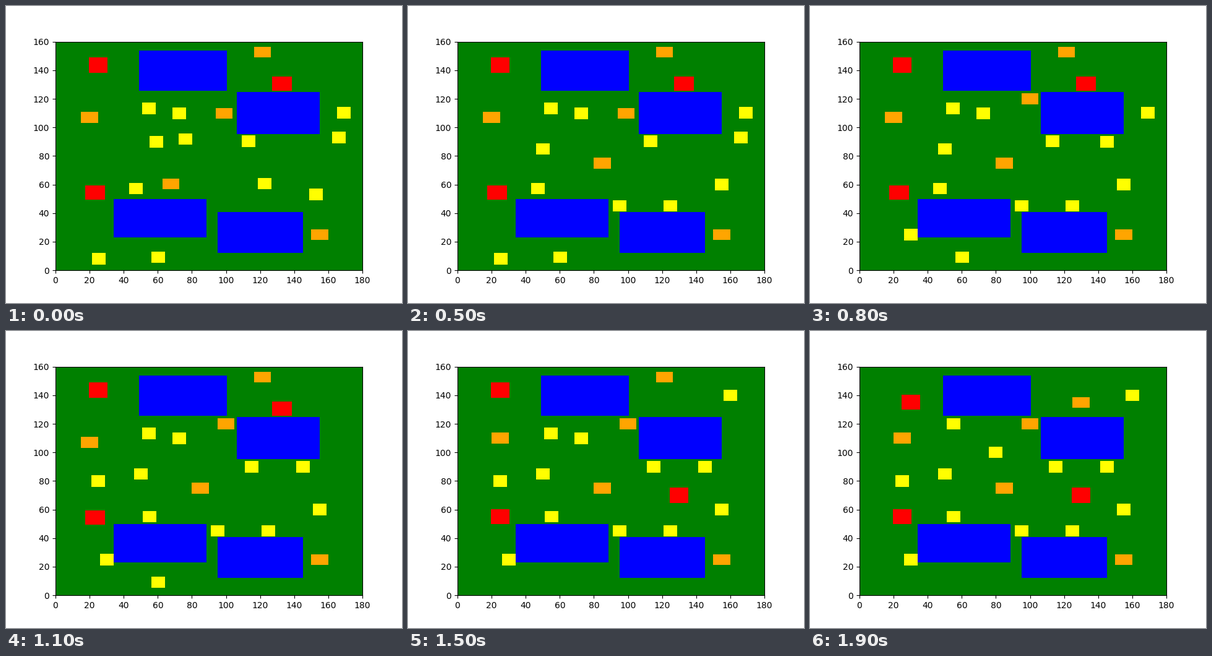
Recreate the animation shown at these times as a matplotlib script. Size 640 px wide and 480 px high, loop 2 s.

```python
import matplotlib.pyplot as plt
from matplotlib.animation import FuncAnimation
from matplotlib.patches import Rectangle

STEPS = 20
STEP_MS = 100

# kind: colour, width, height
KINDS = {
    "small": ("yellow", 8, 8),
    "medium": ("orange", 10, 7.5),
    "large": ("red", 11, 10.5),
    "wide": ("red", 11.6, 10.3),
}

# x, y, width, height
WATER = [
    (49, 125.7, 51.5, 28.1),
    (106.4, 95.3, 48.6, 29.5),
    (34, 23, 54.5, 27),
    (95, 12.2, 50, 28.6),
]

# One house jumps per step, in this order:
# kind before, centre before, kind after, centre after
MOVES = [
    ("small", (76.2, 91.9), "small", (95, 45)),
    ("medium", (67.7, 60.5), "medium", (85, 75)),
    ("small", (122.7, 60.7), "small", (125, 45)),
    ("small", (152.8, 53.1), "small", (155, 60)),
    ("small", (59.15, 89.9), "small", (50, 85)),
    ("medium", (98.9, 109.8), "medium", (100, 120)),
    ("small", (166.2, 93), "small", (145, 90)),
    ("small", (25.4, 8.1), "small", (30, 25)),
    ("small", (113.2, 90.35), "small", (115, 90)),
    ("small", (47.2, 57.2), "small", (55, 55)),
    ("small", (169.1, 110.3), "small", (25, 80)),
    ("wide", (23.2, 54.4), "large", (25, 55)),
    ("medium", (20, 107), "medium", (25, 110)),
    ("wide", (132.8, 130.6), "large", (130, 70)),
    ("small", (60.2, 9.2), "small", (160, 140)),
    ("small", (54.8, 113.3), "small", (55, 120)),
    ("small", (72.6, 109.8), "small", (80, 100)),
    ("medium", (121.4, 152.7), "medium", (130, 135)),
    ("large", (25.05, 143.6), "large", (30, 135)),
]
FIXED_HOUSE = ("medium", (155, 25))

fig, ax = plt.subplots(figsize=(6.4, 4.8), dpi=100)
ax.set_xlim(0, 180)
ax.set_ylim(0, 160)
ax.set_facecolor("green")

for x, y, w, h in WATER:
    ax.add_patch(Rectangle((x, y), w, h, facecolor="blue"))


def place(patch, kind, centre):
    _, w, h = KINDS[kind]
    patch.set_bounds(centre[0] - w / 2, centre[1] - h / 2, w, h)


def add_house(kind, centre):
    patch = Rectangle((0, 0), 1, 1, facecolor=KINDS[kind][0])
    place(patch, kind, centre)
    return ax.add_patch(patch)


add_house(*FIXED_HOUSE)
houses = [add_house(kind, centre) for kind, centre, _, _ in MOVES]


def update(step):
    for i, (house, move) in enumerate(zip(houses, MOVES)):
        place(house, *(move[2:] if i < step else move[:2]))
    return houses


anim = FuncAnimation(fig, update, frames=STEPS, interval=STEP_MS,
                     repeat=True, repeat_delay=0, blit=False)
plt.show()
```
